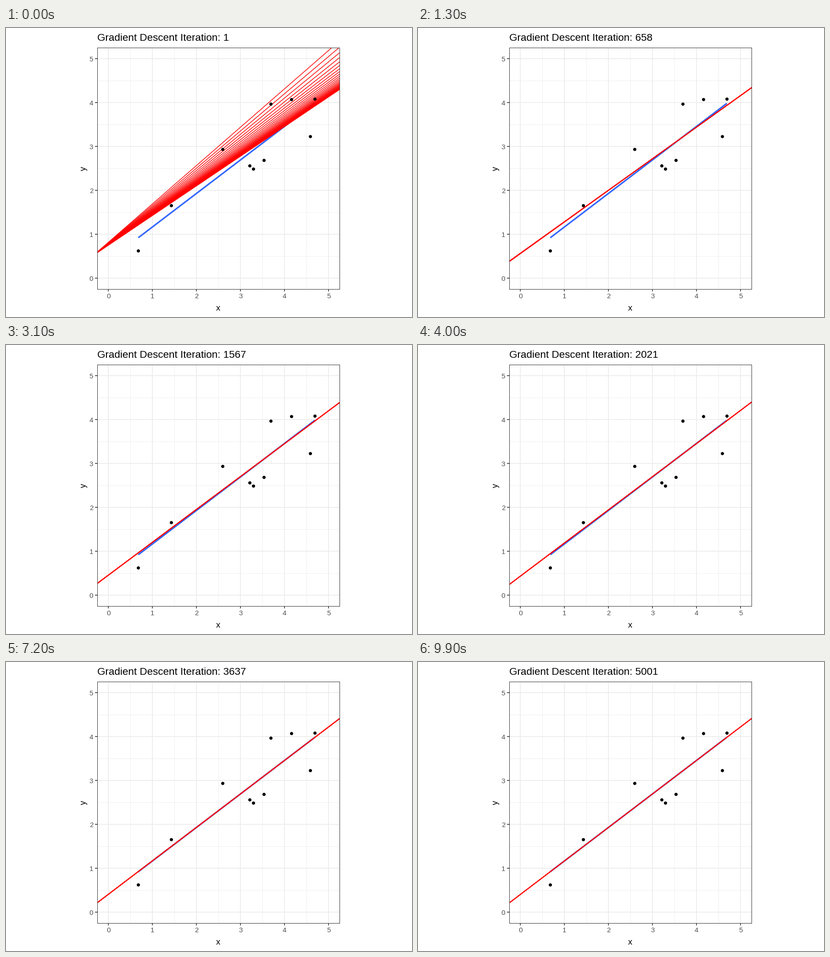
These frames come from a looping animation (885x632 px, 10 s). A matplotlib script:

```python
import numpy as np
import matplotlib.pyplot as plt
from matplotlib.animation import FuncAnimation
from matplotlib.collections import LineCollection

W, H, DPI = 885, 632, 64
PT = 72 / DPI                      # points per pixel
LEFT, RIGHT, TOP, BOTTOM = 199.2, 727.3, 43.2, 571.3
LO, HI = -0.25, 5.25
FRAMES, LAST, RATE = 100, 5001, 0.01

plt.rcParams["font.family"] = "Liberation Sans"

x = np.array([0.679, 1.429, 2.594, 3.208, 3.286, 3.526, 3.687, 4.155, 4.577, 4.686])
y = np.array([0.633, 1.663, 2.943, 2.569, 2.496, 2.689, 3.972, 4.075, 3.227, 4.090])


def descend(intercept, slope):
    """Every (intercept, slope) visited by gradient descent."""
    path = np.empty((LAST, 2))
    for k in range(LAST):
        path[k] = intercept, slope
        err = intercept + slope * x - y
        intercept -= RATE * err.mean()
        slope -= RATE * (err * x).mean()
    return path


path = descend(0.820, 0.874)
# each iteration belongs to its nearest animation step
step = np.floor(np.arange(LAST) * (FRAMES - 1) / (LAST - 1) + 0.5).astype(int)

fig = plt.figure(figsize=(W / DPI, H / DPI), dpi=DPI, facecolor="white")
ax = fig.add_axes([LEFT / W, 1 - BOTTOM / H, (RIGHT - LEFT) / W, (BOTTOM - TOP) / H])
ax.set(xlim=(LO, HI), ylim=(LO, HI))
ax.set_axisbelow(True)
ax.set_xticks(range(6))
ax.set_yticks(range(6))
ax.set_xticks(np.arange(0.5, 5), minor=True)
ax.set_yticks(np.arange(0.5, 5), minor=True)
ax.grid(which="minor", color="#EBEBEB", lw=0.8 * PT)
ax.grid(which="major", color="#EBEBEB", lw=1.6 * PT)
ax.tick_params(which="major", length=5 * PT, width=1.6 * PT, color="#333333",
               labelcolor="#4D4D4D", labelsize=15 * PT, pad=4 * PT)
ax.tick_params(which="minor", length=0)
for spine in ax.spines.values():
    spine.set(color="#333333", linewidth=1 * PT, zorder=10)


def label(px, py, text, size, **kw):
    return fig.text(px / W, 1 - py / H, text, fontsize=size * PT, color="black", **kw)


title = label(199, 28, "", 22.35, ha="left", va="baseline")
label(462.5, 618, "x", 18.3, ha="center", va="baseline")
label(169.5, 307.5, "y", 18.3, ha="center", va="center", rotation=90)

slope, intercept = np.polyfit(x, y, 1)
ends = x[[0, -1]]
ax.plot(ends, intercept + slope * ends, color="#3366FF", lw=3.3 * PT,
        solid_capstyle="butt", zorder=3)
fits = LineCollection([], colors="red", linewidths=1.45 * PT, zorder=4)
ax.add_collection(fits, autolim=False)
ax.plot(x, y, "o", color="black", ms=7 * PT, mew=0, zorder=5)


def draw(i):
    rows = path[step == i]
    fits.set_segments([[(LO, b + m * LO), (HI, b + m * HI)] for b, m in rows])
    count = round(1 + i * (LAST - 1) / (FRAMES - 1))
    title.set_text(f"Gradient Descent Iteration: {count}")
    return fits, title


anim = FuncAnimation(fig, draw, frames=FRAMES, interval=100, repeat=True,
                     repeat_delay=0, blit=False)
plt.show()
```
